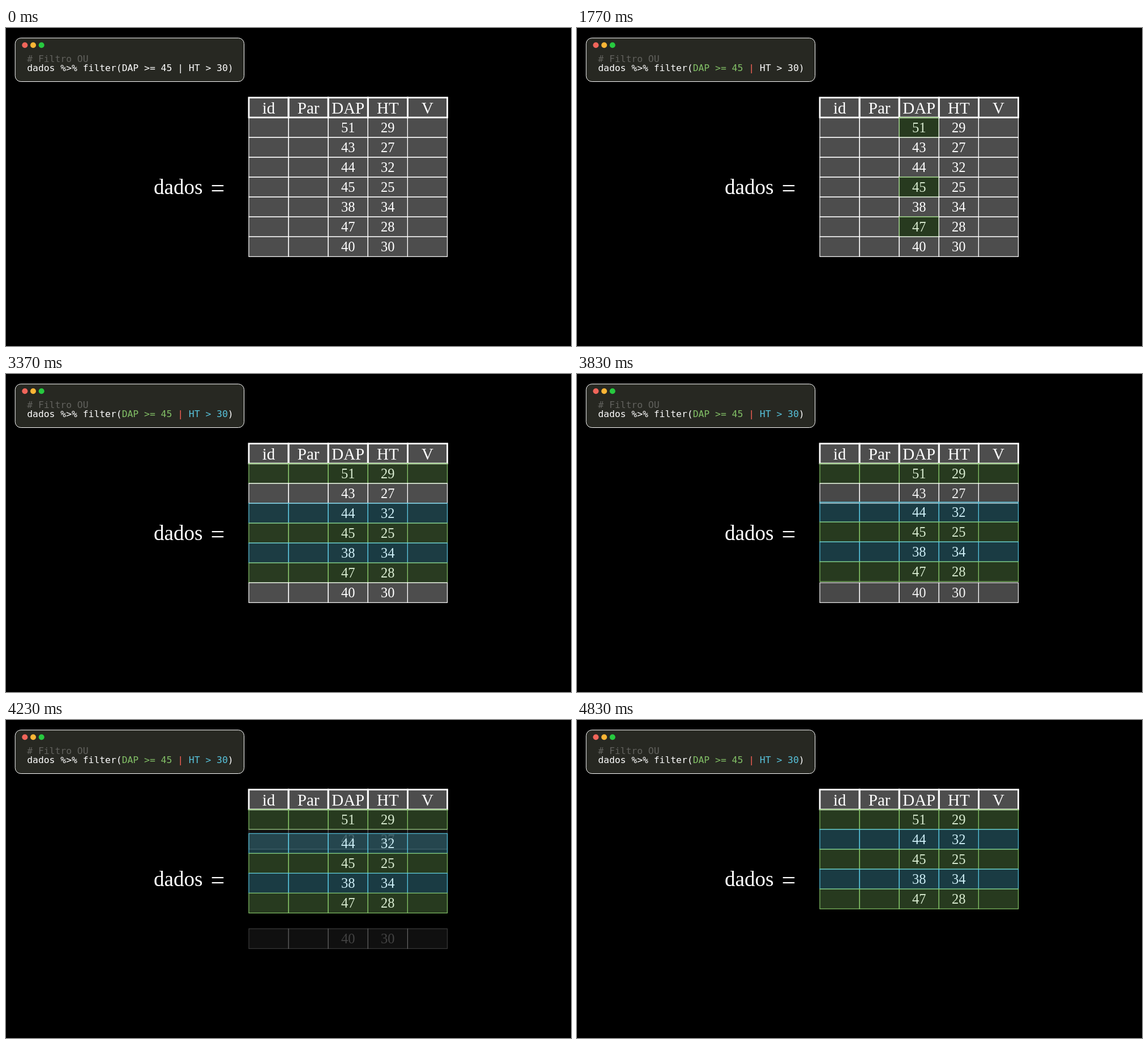
Animation, 998 px wide and 561 px high, one loop 5610 ms. Source, as an HTML page with a canvas:

```html
<!DOCTYPE html>
<html lang="pt">
<head>
<meta charset="utf-8">
<title>Filtro OU</title>
<style>
  html, body { margin: 0; height: 100%; overflow: hidden; background: #000; }
  canvas { display: block; }
</style>
</head>
<body>
<canvas id="stage" width="998" height="561"></canvas>
<script>
const ctx = document.getElementById('stage').getContext('2d');
const LOOP = 5610;
const WHITE = [255, 255, 255], GREEN = [131, 193, 103], BLUE = [88, 196, 221], RED = [252, 98, 85];
const SERIF = '"Liberation Serif", serif';
const MONO = '16.36px "DejaVu Sans Mono", monospace';
const CHAR_W = 9.85, CODE_X = 37.2;

// Table geometry: one unit is an eighth of the stage height
const CELL_W = 561 / 8, CELL_H = CELL_W / 2, LEFT = 428.9, TOP = 122.8;
const HEADERS = ['id', 'Par', 'DAP', 'HT', 'V'];
const DATA = [[51, 29], [43, 27], [44, 32], [45, 25], [38, 34], [47, 28], [40, 30]];

const sigmoid = x => 1 / (1 + Math.exp(-x));

// Sigmoid easing from 0 to 1 between two times
function ease(time, start, end) {
  const p = Math.min(1, Math.max(0, (time - start) / (end - start)));
  const edge = sigmoid(-5);
  return Math.min(1, Math.max(0, (sigmoid(10 * (p - 0.5)) - edge) / (1 - 2 * edge)));
}

function tint(color, amount) {
  return `rgb(${WHITE.map((w, i) => Math.round(w + (color[i] - w) * amount))})`;
}

function text(str, x, y, font, color = '#fff', align = 'center') {
  ctx.font = font;
  ctx.fillStyle = color;
  ctx.textAlign = align;
  ctx.fillText(str, x, y);
}

function cell(col, y, color, lineWidth, alpha = 1) {
  const x = LEFT + col * CELL_W;
  ctx.fillStyle = ctx.strokeStyle = color;
  ctx.lineWidth = lineWidth;
  ctx.globalAlpha = 0.3 * alpha;
  ctx.fillRect(x, y, CELL_W, CELL_H);
  ctx.globalAlpha = alpha;
  ctx.strokeRect(x, y, CELL_W, CELL_H);
  ctx.globalAlpha = 1;
}

function drawCode(green, red, blue) {
  ctx.beginPath();
  ctx.roundRect(16.2, 17.7, 404.3, 76.8, 10);
  ctx.fillStyle = '#272822';
  ctx.fill();
  ctx.strokeStyle = '#fff';
  ctx.lineWidth = 1;
  ctx.stroke();

  ['#f0655a', '#fbb535', '#27c93f'].forEach((color, i) => {
    ctx.beginPath();
    ctx.arc(33.3 + i * 14.7, 30.2, 5, 0, 2 * Math.PI);
    ctx.fillStyle = color;
    ctx.fill();
  });

  text('# Filtro OU', CODE_X, 60.2, MONO, '#62625e', 'left');
  let column = 0;
  for (const [part, color] of [
    ['dados %>% filter(', '#fff'],
    ['DAP >= 45', tint(GREEN, green)],
    [' | ', tint(RED, red)],
    ['HT > 30', tint(BLUE, blue)],
    [')', '#fff'],
  ]) {
    text(part, CODE_X + column * CHAR_W, 76.1, MONO, color, 'left');
    column += part.length;
  }
}

function drawTable(green, blue, rows, move) {
  HEADERS.forEach((name, col) => {
    text(name, LEFT + (col + 0.5) * CELL_W, TOP + 27.8, '29px ' + SERIF);
    cell(col, TOP, '#fff', 2.8);
  });

  let removed = 0;
  DATA.forEach(([dap, ht], row) => {
    const color = dap >= 45 ? GREEN : ht > 30 ? BLUE : null;
    const alpha = color ? 1 : 1 - move;
    const y = TOP + (row + 1 - (color ? removed * move : 0)) * CELL_H;
    if (!color) removed++;

    ctx.globalAlpha = alpha;
    [dap, ht].forEach((value, i) =>
      text(value, LEFT + (i + 2.5) * CELL_W, y + 26, '24.5px ' + SERIF));
    ctx.globalAlpha = 1;

    HEADERS.forEach((_, col) => {
      let amount = rows;
      if (color === GREEN && col === 2) amount = green;
      if (color === BLUE && col === 3) amount = blue;
      cell(col, y, tint(color || WHITE, amount), 1.2, alpha);
    });
  });
}

function draw() {
  const time = performance.now() % LOOP;
  const green = ease(time, 660, 1260);
  const red = ease(time, 1260, 1860);
  const blue = ease(time, 1860, 2460);
  const rows = ease(time, 2570, 3570);
  const move = ease(time, 3600, 4600);

  ctx.fillStyle = '#000';
  ctx.fillRect(0, 0, 998, 561);
  drawCode(green, red, blue);
  text('dados', 261, 293, '37px ' + SERIF, '#fff', 'left');
  text('=', 374, 296.5, '44px ' + SERIF);
  drawTable(green, blue, rows, move);
  requestAnimationFrame(draw);
}
draw();
</script>
</body>
</html>
```
